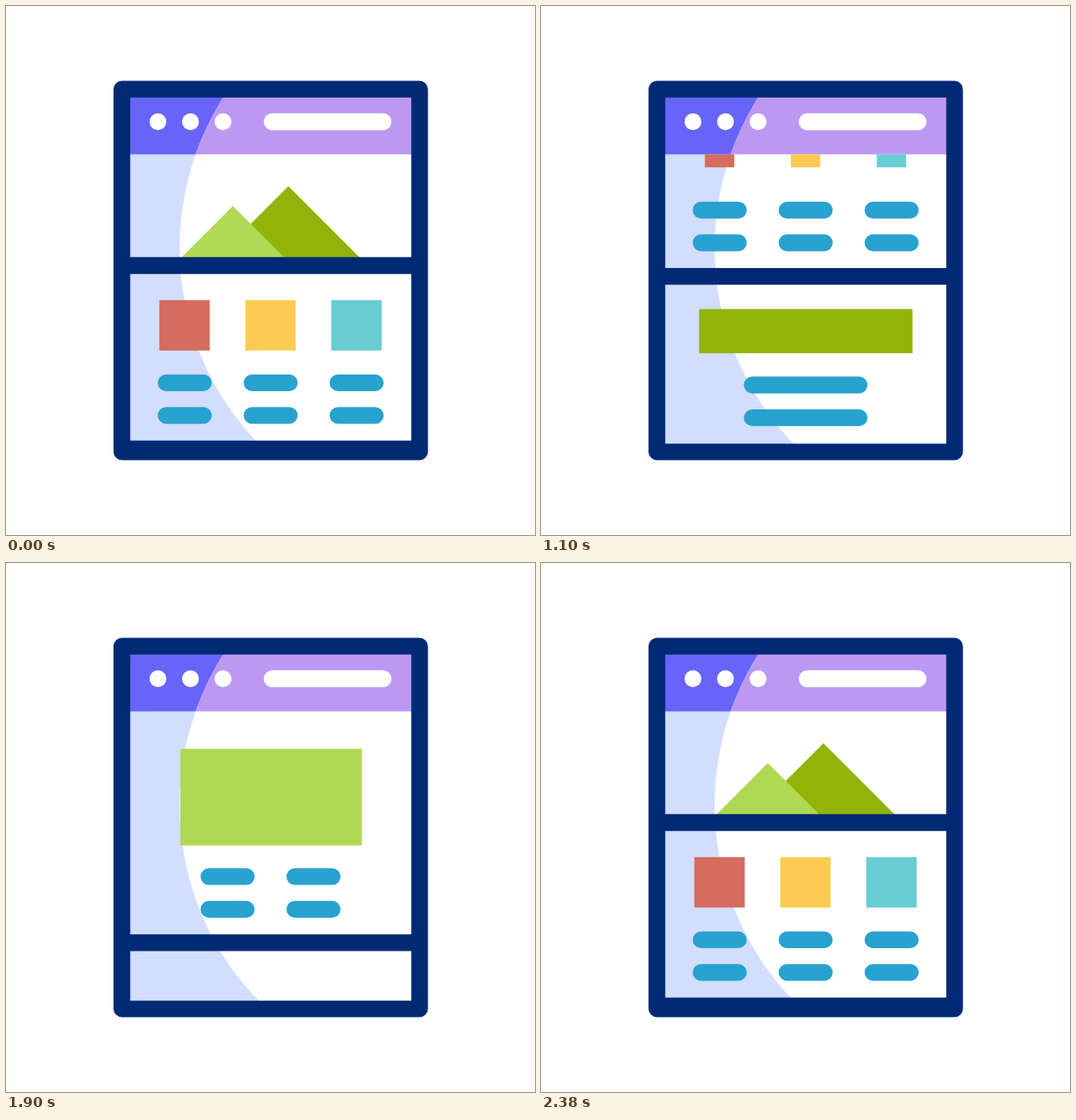
These frames come from a looping animation (640x640 px, 2.4 s). An HTML page:

```html
<!DOCTYPE html>
<html lang="en">
<head>
<meta charset="utf-8">
<title>Scrolling page</title>
<style>
  html, body { margin: 0; width: 100%; height: 100%; overflow: hidden; background: #fff; }
  svg { display: block; width: 100vw; height: 100vh; }
</style>
</head>
<body>
<svg viewBox="0 0 640 640">
  <defs>
    <clipPath id="view"><rect x="145" y="179.5" width="350" height="355"/></clipPath>
    <clipPath id="inside"><rect x="145" y="105" width="350" height="430"/></clipPath>
  </defs>

  <rect x="145" y="105" width="350" height="430" fill="#d3ddfd"/>
  <rect x="145" y="105" width="350" height="74.5" fill="#6864f9"/>
  <g clip-path="url(#inside)">
    <circle cx="551" cy="293" r="341" fill="#fff"/>
  </g>
  <clipPath id="head"><rect x="145" y="105" width="350" height="74.5"/></clipPath>
  <circle cx="551" cy="293" r="341" fill="#bb99f2" clip-path="url(#head)"/>
  <g fill="#fff">
    <circle cx="183.8" cy="140" r="10.2"/>
    <circle cx="223.2" cy="140" r="10.2"/>
    <circle cx="262.6" cy="140" r="10.2"/>
    <rect x="311.8" y="129.7" width="154.6" height="20.6" rx="10.3"/>
  </g>

  <g clip-path="url(#view)">
    <g id="page">
      <path d="M341.7 218L433.7 310H249.7z" fill="#90b507"/>
      <path d="M274.5 242L342.5 310H206.5z" fill="#b0d953"/>
      <rect id="banner" fill="#90b507"/>
      <rect id="card" fill="#b0d953"/>
      <g id="tiles"></g>
      <g id="pills" fill="#28a2cf"></g>
      <path d="M140 148H500M140 314H500M140 536H500" stroke="#022a74" stroke-width="20.4"/>
    </g>
  </g>
  <rect x="140.2" y="100.6" width="360.2" height="438.9" rx="0.5" fill="none"
        stroke="#022a74" stroke-width="20.2" stroke-linejoin="round"/>
</svg>
<script>
const LOOP = 2400, STEP = 20;
const $ = id => document.getElementById(id);

function addRect(parent, attrs) {
  const el = document.createElementNS('http://www.w3.org/2000/svg', 'rect');
  setAttrs(el, attrs);
  parent.appendChild(el);
  return el;
}
function setAttrs(el, attrs) {
  for (const key in attrs) el.setAttribute(key, attrs[key]);
}
// Rectangle of size w x h around (cx, cy)
const box = (cx, cy, w, h) => ({ x: cx - w / 2, y: cy - h / 2, width: w, height: h });

function addPill(cx, cy, w) {
  addRect($('pills'), { ...box(cx, cy, w, 20.4), rx: 10.2 });
}
for (const y of [455.9, 495.4]) for (const x of [216.2, 320.2, 424.2]) addPill(x, y, 65.4);
for (const y of [667.4, 707]) addPill(320.2, y, 149.6);
for (const y of [68, 107.6]) for (const x of [268.1, 372]) addPill(x, y, 65.4);

const tileX = [216, 320, 424];
const tiles = ['#d56c5d', '#fdcb51', '#67cdd3'].map(fill => addRect($('tiles'), { fill }));

// Each track: [time, value] pairs, eased between neighbours
const tracks = {
  scroll: [[80, 0], [680, 212], [1080, 212], [1520, -313], [1880, -313], [2360, 0]],
  tile:   [[80, 61], [680, 35.3], [1080, 35.3], [1520, 61]],
  banner: [[80, 122], [680, 259], [1080, 259], [1520, 122]],
  card:   [[1080, 0.22], [1520, 1], [1880, 1], [2360, 0.22]]
};

function valueAt(track, t) {
  if (t <= track[0][0]) return track[0][1];
  for (let i = 1; i < track.length; i++) {
    const [t0, a] = track[i - 1], [t1, b] = track[i];
    if (t < t1) {
      const p = (t - t0) / (t1 - t0);
      return a + (b - a) * p * p * (3 - 2 * p);
    }
  }
  return track[track.length - 1][1];
}

function draw(t) {
  $('page').setAttribute('transform', `translate(0 ${-valueAt(tracks.scroll, t)})`);

  const size = valueAt(tracks.tile, t);
  tiles.forEach((el, i) => setAttrs(el, box(tileX[i], 386.3, size, size)));

  const wide = valueAt(tracks.banner, t);
  setAttrs($('banner'), box(320.4, 602.2, wide, wide * 0.207));

  const k = valueAt(tracks.card, t);
  setAttrs($('card'), { x: 321 - 110.5 * k, y: -4 - 83 * k, width: 220.5 * k, height: 117.4 * k });
}

const start = performance.now();
function frame() {
  const t = (performance.now() - start) % LOOP;
  draw(Math.floor(t / STEP) * STEP);
  requestAnimationFrame(frame);
}
draw(0);
requestAnimationFrame(frame);
</script>
</body>
</html>
```
